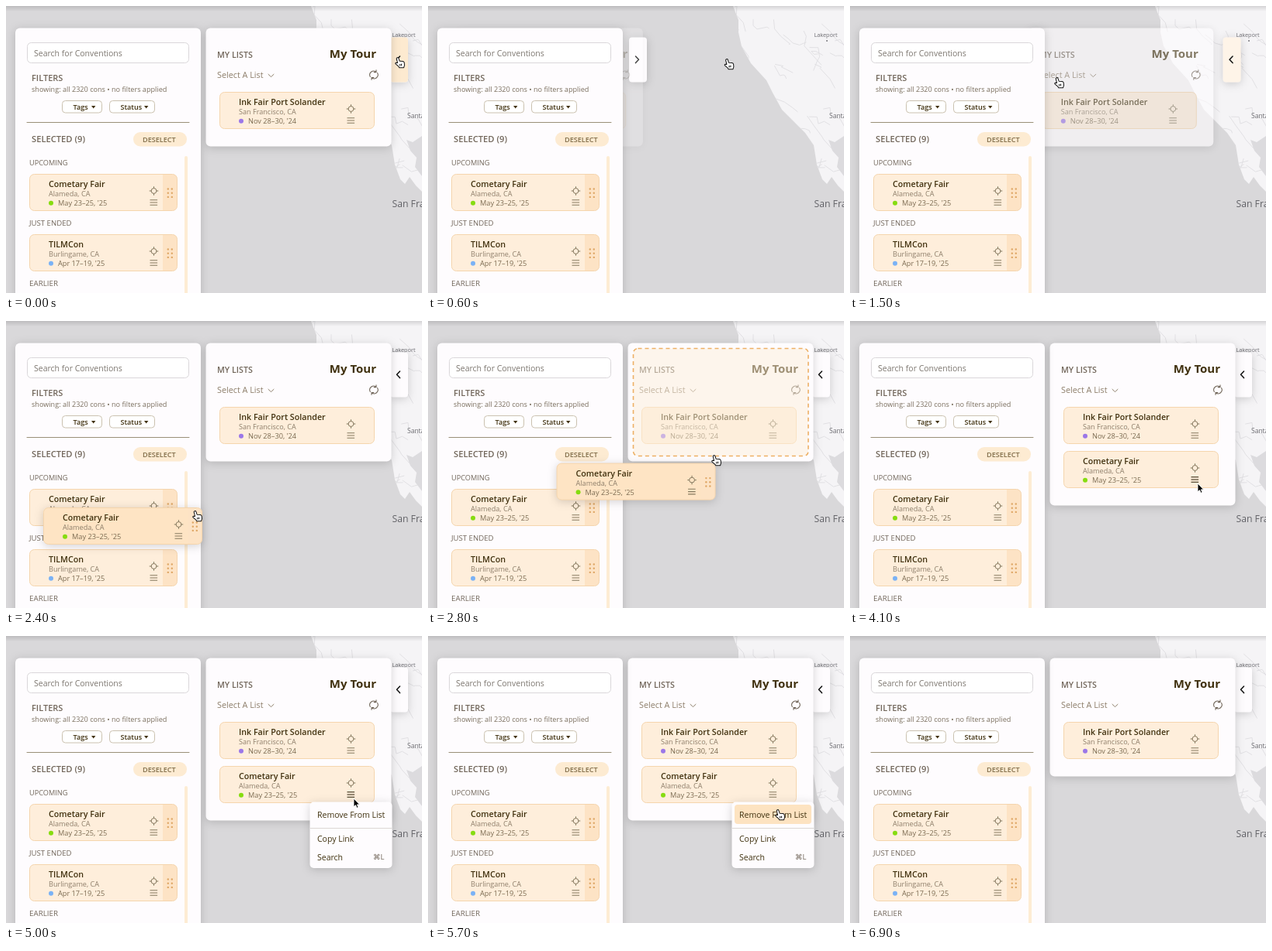
Recreate the animation shown at these times as an HTML page. Size 536 px wide and 371 px high, loop 7000 ms.

```html
<!DOCTYPE html>
<html lang="en">
<head>
<meta charset="utf-8">
<title>Convention lists</title>
<style>
html, body { margin: 0; width: 100%; height: 100%; overflow: hidden; background: #d9d8da; }
svg { display: block; width: 536px; height: 371px; font-family: "Open Sans", sans-serif; }
.paper { fill: #fefcfe; }
.shadow { filter: drop-shadow(0 2px 6px rgba(0, 0, 0, .17)); }
.line { fill: none; stroke-linecap: round; stroke-linejoin: round; }
</style>
</head>
<body>
<svg id="stage" viewBox="0 0 536 371"></svg>
<script>
const LOOP = 7000;
const stage = document.getElementById('stage');
const INK = '#40310f', MUTED = '#71665a', SOFT = '#8d7e6a';

const text = (x, y, size, fill, str, weight = 400, extra = '') =>
  `<text x="${x}" y="${y}" font-size="${size}" fill="${fill}" font-weight="${weight}" ${extra}>${str}</text>`;
const rect = (x, y, w, h, r, extra) =>
  `<rect x="${x}" y="${y}" width="${w}" height="${h}" rx="${r}" ${extra}/>`;
const line = (d, color, width = 1, extra = '') =>
  `<path class="line" d="${d}" stroke="${color}" stroke-width="${width}" ${extra}/>`;

// Convention card with its top left corner at 0,0
function card(w, title, place, dot, date, { handle = false, fill = '#feeedb' } = {}) {
  const ix = w - 30.5;
  let s = rect(.5, .5, w - 1, 47, 6, `fill="${fill}"`);
  if (handle) {
    s += `<path d="M${w - 19} 1H${w - 6}q5 0 5 5V42q0 5-5 5H${w - 19}z" fill="#fde3c5"/>`;
    for (let i = 0; i < 6; i++)
      s += `<circle cx="${w - 12.2 + i % 2 * 5}" cy="${19.5 + (i >> 1) * 5.2}" r="1.2" fill="#dfa766"/>`;
  }
  return s + rect(.5, .5, w - 1, 47, 6, 'fill="none" stroke="#f5d5ad"') +
    text(25, 17, 10.7, INK, title, 600) + text(25, 29, 9.1, SOFT, place) +
    `<circle cx="28" cy="37.7" r="3" fill="${dot}"/>` + text(37, 41, 9.2, '#7a6a50', date) +
    `<circle cx="${ix}" cy="22" r="3.4" fill="none" stroke="#85795f"/>` +
    line(`M${ix} 16.6v2M${ix} 25.4v2M${ix - 5.4} 22h2M${ix + 3.4} 22h2`, '#85795f') +
    `<path class="bars" d="M${ix - 5} 33.7h9.6M${ix - 5} 37h9.6M${ix - 5} 40.3h9.6" stroke="#85795f" stroke-width="1.1"/>`;
}
const camp = (w, opts) => card(w, 'Cometary Fair', 'Alameda, CA', '#86dc10', "May 23–25, '25", opts);
const place = (x, y, body, id = '') => `<g ${id && `id="${id}"`} transform="translate(${x} ${y})">${body}</g>`;

function map() {
  let seed = 7;
  const rnd = () => (seed = seed * 16807 % 2147483647) / 2147483647;
  const coast = 'M393 0L400 18V34L404 52 416 74 436 96 444 112 456 134 472 150 486 164 497 180 501 205 508 224 514 230 520 221 528 232 536 240V0z';
  let roads = '';
  for (let i = 0; i < 34; i++) {
    roads += `M${395 + rnd() * 141} ${rnd() * 225}`;
    for (let j = 0; j < 4; j++) roads += `l${rnd() * 18 - 5} ${rnd() * 18 - 4}`;
  }
  return rect(0, 0, 536, 371, 0, 'fill="#d9d8da"') +
    `<clipPath id="land"><path d="${coast}"/></clipPath><path d="${coast}" fill="#f5f4f6"/>
     <g clip-path="url(#land)">${line(roads, '#dfdee1', .9)}
     <path d="M536 168l-12 8-8-3 5 14 8 9-2 12 9 12z" fill="#dcdbde"/></g>` +
    text(497.5, 40, 7.3, '#6d6d72', 'Lakeport') + '<circle cx="514" cy="45" r="1" fill="#77777b"/>' +
    text(517, 145, 8.5, '#6d6d72', 'Santa Rosa') + text(497.5, 260, 12.2, '#626267', 'San Francisco') +
    `<linearGradient id="top" x2="0" y2="1"><stop stop-opacity=".13"/><stop offset="1" stop-opacity="0"/></linearGradient>` +
    rect(0, 0, 536, 7, 0, 'fill="url(#top)"');
}

const toggle = `<g id="toggle" class="shadow">
  ${rect(495, 40.5, 23, 58, 4, 'class="paper"')}
  ${rect(495, 40.5, 23, 58, 4, 'id="tint" fill="#fdead0"')}
  ${line('M507.5 65l-4 4.3 4 4.3', '#111', 1.5, 'id="chevron"')}</g>`;

const listPanel = `<g id="panel">
  ${rect(257.5, 28.5, 239, 153, 6, 'id="sheet" class="paper shadow"')}
  ${text(272, 67, 10.7, MUTED, 'MY LISTS', 600)}
  ${text(477, 67, 15, INK, 'My Tour', 700, 'text-anchor="end"')}
  ${text(272, 93, 10.8, SOFT, 'Select A List')}
  ${line('M338 88.3l3.5 3.3 3.5-3.3', SOFT)}
  ${line('M469.3 91.5a5 5 0 0 1 7.5-6.3M478.6 86.5a5 5 0 0 1-7.5 6.3M477 82.8v2.8h-2.8M471 95.3v-2.8h2.8', MUTED, 1.1)}
  ${place(275, 111, card(200, 'Ink Fair Port Solander', 'San Francisco, CA', '#9b77e8', "Nov 28–30, '24"))}
  ${place(275, 168, camp(200), 'added')}
  ${rect(264.5, 35.5, 225.5, 139, 6, 'id="zone" fill="#fdf0dc" fill-opacity=".5" stroke="#edb065" stroke-width="1.6" stroke-dasharray="5 4"')}
</g>`;

const button = (x, w, label) => rect(x, 122.5, w, 15.5, 4, 'fill="#fff" stroke="#cbc2b0"') +
  text(x + 14, 134, 9.1, INK, label, 600) + `<path d="M${x + w - 13.5} 129h5.4l-2.7 3.4z" fill="${INK}"/>`;

const sidePanel = rect(12, 28.5, 239, 360, 6, 'class="paper shadow"') +
  rect(27.5, 47.5, 208, 26, 5, 'fill="#fff" stroke="#dad7da"') +
  text(36, 65, 10.5, '#7d7770', 'Search for Conventions') +
  text(33, 97, 11, MUTED, 'FILTERS', 600) +
  text(33, 111, 9.1, '#7a6f5e', 'showing: all 2320 cons • no filters applied') +
  button(72.5, 51, 'Tags') + button(133.5, 58, 'Status') +
  line('M27 150.5H236', '#9a9078') +
  text(33, 176, 11.2, MUTED, 'SELECTED (9)', 600) +
  rect(164, 163, 69, 18.5, 9, 'fill="#fdebd2"') + text(176, 176, 9.1, '#806d49', 'DESELECT', 600) +
  rect(230, 194, 4, 190, 2, 'fill="#fdecd3"') +
  text(30, 206, 9.2, MUTED, 'UPCOMING', 500) + place(30, 217, camp(191, { handle: true })) +
  text(30, 284, 9.6, MUTED, 'JUST ENDED', 500) +
  place(30, 295, card(191, 'TILMCon', 'Burlingame, CA', '#7ab2f5', "Apr 17–19, '25", { handle: true })) +
  text(30, 362, 9.8, MUTED, 'EARLIER', 500);

const menu = `<g id="menu">
  ${rect(391.5, 214.5, 106, 85.5, 5, 'class="paper shadow"')}
  ${rect(395, 218, 99, 25, 4, 'id="active" fill="#fde3c1"')}
  ${text(401, 234.5, 10.5, INK, 'Remove From List')}
  ${line('M392 248.5H497', '#dcd8d4')}
  ${text(401, 265.5, 10.5, INK, 'Copy Link')}${text(401, 289.5, 10.5, INK, 'Search')}
  ${text(487.5, 289, 9.5, MUTED, '⌘L', 400, 'text-anchor="end"')}</g>`;

const cursor = `<g id="cursor" stroke-linejoin="round">
  <g id="hand" stroke="#111" stroke-width="1.1" transform="translate(1.4 .6) scale(.92)">
  <path fill="#fff" d="M-2 7.5L-3.4 1.9a1.5 1.5 0 0 1 2.9-.8L.8 5l4.6.2q1.7.3 2 2.2l.3 3.4-1 3.4H.4L-.6 12.6l-4.1-3.5q-1-1.5.9-1.9z"/>
  <path fill="none" d="M1.4 9v2.8M3.4 8.8v2.8"/></g>
  <path id="arrow" stroke="#fff" stroke-width=".9" d="M0 0V10.8L2.5 8.6 4.1 12.3 6 11.5 4.4 7.9H7.6z"/></g>`;

stage.innerHTML = map() + toggle + listPanel + sidePanel +
  `<g id="drag" class="shadow">${camp(205, { handle: true, fill: '#fee4c4' })}</g>` + menu + cursor;

const el = Object.fromEntries([...stage.querySelectorAll('[id]')].map(e => [e.id, e]));
const bars = el.added.querySelector('.bars');
const move = (e, x, y) => e.setAttribute('transform', `translate(${x} ${y})`);
const fade = (e, opacity) => e.style.opacity = opacity;
const show = (e, on) => e.style.display = on ? '' : 'none';

const ramp = (t, from, to) => Math.min(1, Math.max(0, (t - from) / (to - from)));
const smooth = u => u * u * (3 - 2 * u);
const easeOut = (u, power) => 1 - (1 - u) ** power;

// Position along [time, x, y] stops
function along(stops, t) {
  let i = 1;
  while (i < stops.length - 1 && t > stops[i][0]) i++;
  const [a, b] = [stops[i - 1], stops[i]], u = smooth(ramp(t, a[0], b[0]));
  return [a[1] + (b[1] - a[1]) * u, a[2] + (b[2] - a[2]) * u];
}

const POINTER = [[0, 505, 66], [300, 505, 66], [900, 267, 70], [1250, 267, 72], [1500, 267, 92],
  [1900, 212, 236], [2050, 212, 236], [2400, 244, 245], [3050, 430, 138], [3200, 433, 140],
  [3500, 433, 141], [4050, 448, 210], [5000, 448, 210], [5500, 451, 224]];
const DRAG = [[2050, 30, 217], [2400, 48, 241], [3150, 261, 137]];

function draw(t) {
  const opening = t >= 1000;
  const start = opening ? 1200 : 200;
  const state = u => opening ? 1 - u : u;
  const slide = state(easeOut(ramp(t, start, start + 400), 2));
  const panelTime = ramp(t, start, start + 600);
  move(el.toggle, -236 * slide, 0);
  move(el.panel, -228 * state(easeOut(panelTime, 3)), 0);
  fade(el.panel, 1 - state(easeOut(panelTime, 1.4)));
  if (t >= 500 && t < 1200) el.chevron.setAttribute('transform', 'rotate(180 505.5 69.3)');
  else el.chevron.removeAttribute('transform');
  fade(el.tint, t < 850 ? 1 - ramp(t, 200, 400) : ramp(t, 850, 950) - ramp(t, 1300, 1700));

  const dragging = t >= 2050 && t < 3400;
  show(el.drag, dragging);
  move(el.drag, ...along(DRAG, t));
  fade(el.zone, ramp(t, 2650, 2800) - ramp(t, 3400, 3550));

  const grow = smooth(ramp(t, 3400, 3700)) - smooth(ramp(t, 5800, 6100));
  el.sheet.setAttribute('height', 153 + 57 * grow);
  fade(el.added, ramp(t, 3450, 3800) - ramp(t, 5800, 5950));
  bars.setAttribute('stroke', t >= 3950 && t < 5150 ? '#2a2008' : '#85795f');

  fade(el.menu, ramp(t, 4900, 5000) - ramp(t, 5800, 5900));
  show(el.active, t >= 5150);

  const arrow = t >= 3500 && t < 5200 || t >= 5900;
  show(el.cursor, t < 6200);
  show(el.arrow, arrow);
  show(el.hand, !arrow);
  move(el.cursor, ...along(POINTER, t));
}

function tick() {
  draw(performance.now() % LOOP);
  requestAnimationFrame(tick);
}
tick();
</script>
</body>
</html>
```
